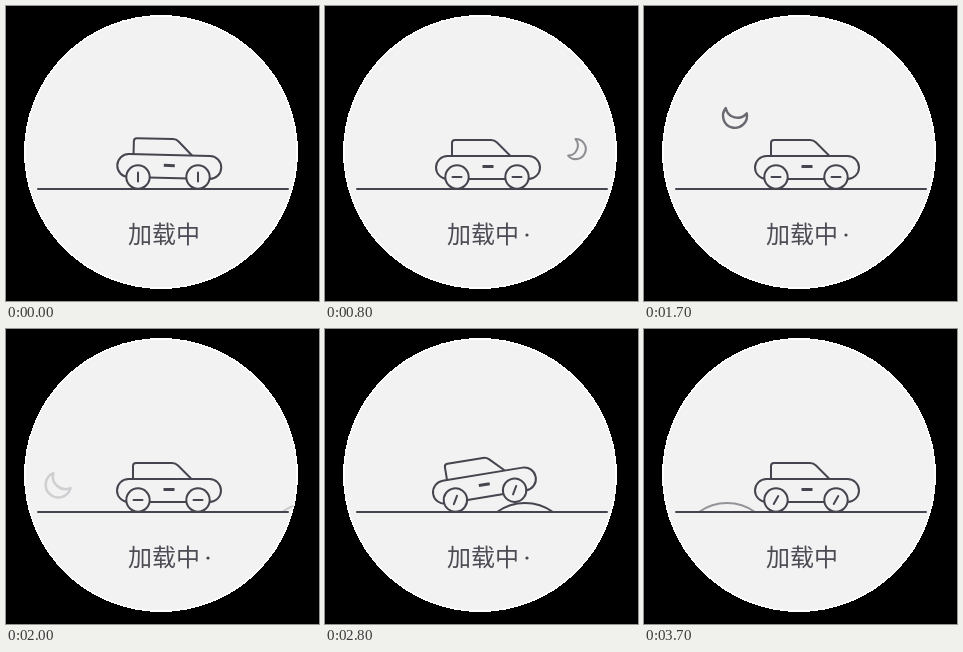
Animation, 313 px wide and 295 px high, one loop 3800 ms. Source, as an HTML page:

```html
<!DOCTYPE html>
<html lang="zh">
<head>
<meta charset="utf-8">
<style>
  html, body { margin: 0; width: 100%; height: 100%; overflow: hidden; background: #000; }
  svg { display: block; width: 313px; height: 295px; }
  text { font: 24px "Noto Sans CJK SC", "Noto Sans CJK", sans-serif; fill: #4c4c55; }
  .ink { fill: none; stroke: #45454f; stroke-width: 2; stroke-linecap: round; stroke-linejoin: round; }
  .paper { fill: #f2f2f2; }
  .disc { stroke: #fff; stroke-width: 1.5; shape-rendering: crispEdges; }
  .handle { stroke-width: 3; stroke-linecap: butt; }
</style>
</head>
<body>
<svg viewBox="0 0 313 295">
  <defs>
    <clipPath id="road"><rect x="24" y="160" width="264" height="24"/></clipPath>
  </defs>
  <circle class="paper disc" cx="155" cy="146" r="136.250"/>
  <g id="sun" class="ink">
    <circle r="7.500"/>
    <g id="rays"></g>
  </g>
  <path id="moon" class="ink" d="M-4.400 -9A10 10 0 1 1 -4.400 9A10 10 0 0 0 -4.400 -9Z"/>
  <g clip-path="url(#road)"><path id="hump" class="ink" d="M-28 183A48 48 0 0 1 28 183"/></g>
  <path class="ink" d="M32 183H282"/>
  <circle id="puff" class="ink" r="4.500"/>
  <g id="car" class="ink">
    <g id="shell">
      <path d="M127 150V137Q127 134 130 134H166Q169.500 134 172 136.500L185.500 150"/>
      <rect class="paper" x="111" y="150" width="104" height="23" rx="11.500"/>
      <path class="handle" d="M157.500 160.500H168.500"/>
    </g>
    <g transform="translate(132 171)"><circle class="paper" r="11.700"/><path class="bar" d="M-4.500 0H4.500"/></g>
    <g transform="translate(192 171)"><circle class="paper" r="11.700"/><path class="bar" d="M-4.500 0H4.500"/></g>
  </g>
  <text x="122" y="237.400">加载中</text>
  <g fill="#45454f">
    <circle class="dot" cx="202" cy="229" r="1.600"/>
    <circle class="dot" cx="209.500" cy="229" r="1.600"/>
    <circle class="dot" cx="217.500" cy="229" r="1.600"/>
  </g>
</svg>
<script>
const LOOP = 3800, STEP = 100;
const $ = id => document.getElementById(id);
const all = sel => [...document.querySelectorAll(sel)];
const clamp = v => Math.max(0, Math.min(1, v));
const rad = deg => deg * Math.PI / 180;
const bars = all('.bar'), dots = all('.dot');

$('rays').innerHTML = Array.from({ length: 8 }, (_, i) =>
  `<path d="M11 0H14" transform="rotate(${i * 45})"/>`).join('');

function place(el, x, y, rest = '') {
  el.setAttribute('transform', `translate(${x} ${y}) ${rest}`);
}

// Sky objects travel right to left on one arc.
function orbit(el, deg, opacity, rest) {
  el.setAttribute('opacity', opacity);
  place(el, 155 + 113 * Math.cos(rad(deg)), 203 - 113 * Math.sin(rad(deg)), rest);
}

// How far (0..1) a wheel is lifted at distance d from the hump's middle.
const lift = d => Math.abs(d) < 34 ? Math.cos(Math.PI * d / 68) : 0;

function drawSky(n) {
  const sunOn = n >= 1 && n <= 6;
  orbit($('sun'), 25 + 26 * (n - 1), sunOn ? clamp(Math.min(n, 7 - n) / 2) : 0);

  const k = (n - 8) / 9;
  const fade = clamp(Math.min((n - 6) / 3.4, (21 - n) / 5));
  orbit($('moon'), 32 + 92.5 * k, n < 8 ? 0 : fade,
    `rotate(${24 + 80 * k}) scale(${1 + 0.2 * k})`);
}

function drawCar(n, humpX) {
  const rear = lift(humpX - 132), front = lift(humpX - 192);
  const tilt = Math.asin((8.8 * rear - 10.5 * front) / 60) * 180 / Math.PI;
  place($('car'), 132 - 1.7 * front - 5 * rear, 171 - 8.8 * rear,
    `rotate(${tilt}) translate(-132 -171)`);
  // The body rocks once as the car sets off.
  const rock = n ? 0 : 1;
  place($('shell'), 0, -rock, `rotate(${1.4 * rock} 163 172)`);
  const spin = n ? 60 * n + 60 : 90;
  bars.forEach(b => b.setAttribute('transform', `rotate(${spin})`));
}

function drawPuff(n) {
  const age = [13, 24, 32].map(s => n - s).find(a => a >= 0 && a < 4);
  const on = age !== undefined;
  $('puff').setAttribute('opacity', on ? [0.8, 1, 0.8, 0.5][age] : 0);
  if (on) place($('puff'), 103.3 - 15 * age, 134 + (3 - age) ** 2 * 2.1);
}

function drawDots(n) {
  const phase = 3 * n % 37;
  const one = phase >= 10 && phase < 25, two = phase >= 25;
  dots.forEach((d, i) => d.setAttribute('opacity', (i ? two : one) ? 1 : 0));
}

function draw(ms) {
  const n = Math.floor(ms % LOOP / STEP);
  const humpX = 200 - 13 * (n - 28);
  place($('hump'), humpX, 0);
  $('hump').setAttribute('opacity', clamp(Math.min((n - 19) / 4.5, (39.2 - n) / 4)));
  drawSky(n);
  drawCar(n, humpX);
  drawPuff(n);
  drawDots(n);
}

const start = performance.now();
function tick() {
  draw(performance.now() - start);
  requestAnimationFrame(tick);
}
tick();
</script>
</body>
</html>
```
